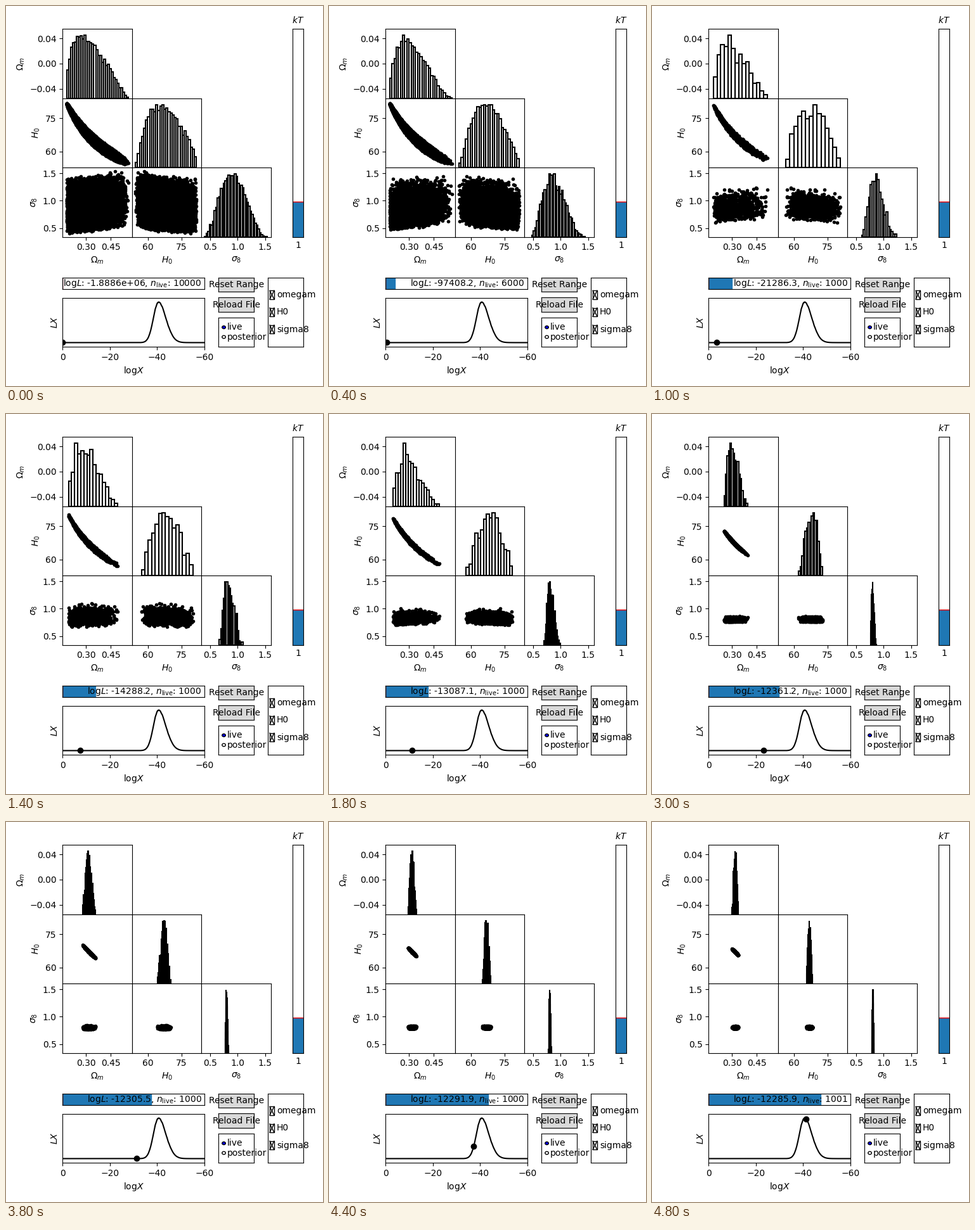
Animation, 500 px wide and 600 px high, one loop 5 s. Source, as a matplotlib script:

```python
import matplotlib.pyplot as plt
import numpy as np
from matplotlib.animation import FuncAnimation
from matplotlib.patches import Circle, Rectangle

W, H, FRAMES, STEP = 500, 600, 25, 2000
fig = plt.figure(figsize=(W / 100, H / 100), dpi=100)


def panel(left, top, right, bottom, **kw):
    """Bare axes placed by pixel edges, measured from the top left."""
    ax = fig.add_axes([left / W, 1 - bottom / H, (right - left) / W, (bottom - top) / H], **kw)
    ax.set(xticks=[], yticks=[], xlim=(0, 1), ylim=(0, 1))
    return ax


# Corner plot
LEFT, TOP, SIDE = 89.3, 36.2, 109.45
LABELS = [r'$\Omega_m$', r'$H_0$', r'$\sigma_8$']
LIMITS = [(0.1585, 0.579), (52.85, 83.95), (0.342, 1.603)]
TICKS = [[0.30, 0.45], [60, 75], [0.5, 1.0, 1.5]]
BASE = -0.055

hist_axes, clouds = [], {}
for row in range(3):
    for col in range(row + 1):
        x, y = LEFT + col * SIDE, TOP + row * SIDE
        ax = panel(x, y, x + SIDE, y + SIDE)
        ax.set_xlim(LIMITS[col])
        if row == col:
            ax.set_ylim(BASE, -BASE)
            hist_axes.append(ax)
        else:
            ax.set_ylim(LIMITS[row])
            clouds[row, col], = ax.plot([], [], 'k.')
        if row == 2:
            ax.set_xticks(TICKS[col])
            ax.set_xlabel(LABELS[col])
        if col == 0:
            ax.set_yticks(TICKS[row] if row else [-0.04, 0, 0.04])
            ax.set_ylabel(LABELS[row])

# Temperature slider
ax = panel(452.2, TOP, 468.9, TOP + 3 * SIDE)
ax.axhspan(0, 0.169, color='C0')
ax.axhline(0.169, color='r', lw=1)
ax.text(0.5, 1.02, '$kT$', ha='center', va='bottom')
ax.text(0.5, -0.02, '1', ha='center', va='top')

# Progress slider
ax = panel(LEFT, 428.9, 313, 447)
progress = ax.add_patch(Rectangle((0, 0), 0, 1, color='C0'))
ax.axvline(0, color='r', lw=1)
readout = ax.text(0.98, 0.5, '', ha='right', va='center')

# Evidence curve: a slightly rough bump, steeper on its left side
depth = np.linspace(0, 60, 1201)
rough = np.convolve(np.random.default_rng(4).normal(size=depth.size), np.ones(12) / 12, 'same')
mass = np.exp(-0.5 * ((depth - 40.5) / np.where(depth < 40.5, 2.1, 3.2)) ** 2)
mass *= 1 + 0.03 * rough
mass /= mass.max()
ax = panel(LEFT, 461, 313, 537.9)
ax.set(xlim=(0, -60), ylim=(-0.1, 1.1), xticks=[0, -20, -40, -60])
ax.set_xlabel(r'$\mathrm{log}X$')
ax.set_ylabel('$LX$')
ax.plot(-depth, mass, 'k')
marker, = ax.plot([], [], 'ko')

# Buttons and selectors
for top, label in [(428.9, 'Reset Range'), (460.4, 'Reload File')]:
    ax = panel(335.2, top, 391, top + 22.4, facecolor='0.85')
    ax.text(0.5, 0.5, label, ha='center', va='center')

ax = panel(335.2, 492, 391, 537.9)
for y, label, color in [(2 / 3, 'live', 'blue'), (1 / 3, 'posterior', 'white')]:
    ax.add_patch(Circle((0.15, y), 0.05, facecolor=color, edgecolor='k'))
    ax.text(0.25, y, label, va='center')

ax = panel(413.2, 428.9, 468.9, 537.9)
for y, label in [(0.75, 'omegam'), (0.5, 'H0'), (0.25, 'sigma8')]:
    x0, x1, y0, y1 = 0.05, 0.175, y - 0.0625, y + 0.0625
    ax.add_patch(Rectangle((x0, y0), x1 - x0, y1 - y0, facecolor='w', edgecolor='k'))
    ax.plot([x0, x1], [y0, y1], 'k', lw=1)
    ax.plot([x0, x1], [y1, y0], 'k', lw=1)
    ax.text(0.25, y, label, va='center')

# The likelihood gap below its ceiling shrinks geometrically between key points
CEILING = -12270
LOG_L = {0: -1888600, 2: -97408.2, 7: -14288.2, 11: -12600.8,
         15: -12361.2, 19: -12305.5, 24: -12285.9}
LOG_GAP = np.log(CEILING - np.array(list(LOG_L.values())))


def log_likelihood(i):
    return CEILING - np.exp(np.interp(i, list(LOG_L), LOG_GAP))


def live_count(i):
    return 1001 if i == FRAMES - 1 else max(10000 - STEP * i, 1000)


def log_volume(i):
    return np.log(1 - 0.2 * i) if i < 5 else -np.log(10) - 1 - 2 * (i - 5)


def falloff(i, size, half, power):
    return size / (1 + (i / half) ** power)


def live_points(i):
    """Points spread around the best fit, closing in as the run goes on."""
    rng = np.random.default_rng(100 + i)
    n = live_count(i)
    s = i / (FRAMES - 1)
    bulge = np.sin(np.pi * s)

    below, above = falloff(i, 0.133, 15, 4), falloff(i, 0.247, 13, 3.6)
    u = rng.beta(1.4 + 1.6 * s, 2.3 + 1.2 * bulge + 0.7 * s, n)
    omega = 0.316 - below + (below + above) * u

    spread = np.sqrt(4 * u * (1 - u)) * (2 * rng.beta(2, 2, n) - 1)
    hubble = 67.2 * (0.316 / omega) ** 0.355 + falloff(i, 2.8, 7, 2) * spread

    below, above = falloff(i, 0.39, 5, 1.7), falloff(i, 0.69, 7, 2.8)
    span = below + above
    sigma = 0.81 - below + span * rng.beta(2.6, 3 + 1.7 * abs(bulge) ** 0.5, n)
    sigma += 0.35 * span * (omega - omega.mean())
    return omega, hubble, sigma


bars = []


def update(i):
    while bars:
        bars.pop().remove()
    data = live_points(i)
    for ax, values in zip(hist_axes, data):
        counts, edges = np.histogram(values, bins='auto')
        bars.append(ax.bar(edges[:-1], 0.1 * counts / counts.max(), np.diff(edges), BASE,
                           align='edge', facecolor='none', edgecolor='k', lw=1.5))
        ax.set_ylim(BASE, -BASE)
    for (row, col), cloud in clouds.items():
        cloud.set_data(data[col], data[row])
    log_x = log_volume(i)
    marker.set_data([log_x], [np.interp(-log_x, depth, mass)])
    progress.set_width(0.0329 * i)
    readout.set_text(rf'$\mathrm{{log}}L$: {log_likelihood(i):.6g}, '
                     rf'$n_\mathrm{{live}}$: {live_count(i)}')


anim = FuncAnimation(fig, update, frames=FRAMES, init_func=lambda: update(0),
                     interval=200, repeat=True, repeat_delay=0)
plt.show()
```
